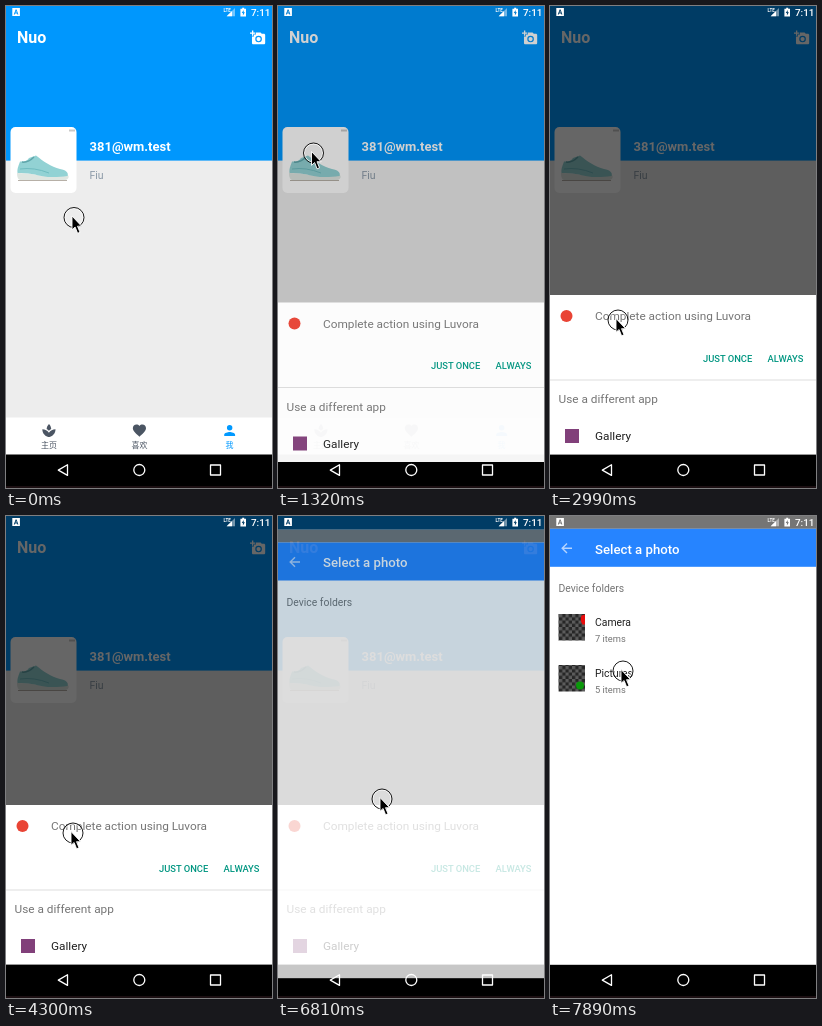
These frames come from a looping animation (266x482 px, 8 s). An HTML page:

```html
<!DOCTYPE html>
<html lang="en">
<head>
<meta charset="utf-8">
<title>Choose a picture</title>
<style>
  html, body { margin: 0; width: 100%; height: 100%; overflow: hidden; background: #000; }
  svg { display: block; width: 100vw; height: 100vh; }
  text { font-family: Roboto, "Noto Sans CJK SC", "Noto Sans CJK", sans-serif; }
  .body { font-size: 11.82px; fill: #757575; }
  .dark { fill: #212121; }
  .action { font-size: 9.38px; font-weight: 500; fill: #009681; }
  .tab { font-size: 8px; text-anchor: middle; fill: #4b5563; }
  .small { font-size: 10.4px; }
  .count { font-size: 9.3px; fill: #757575; }
</style>
</head>
<body>
<svg viewBox="0 0 266 482" preserveAspectRatio="none">
  <defs>
    <pattern id="checker" width="6.5" height="6.5" patternUnits="userSpaceOnUse" x="9" y="98">
      <rect width="6.5" height="6.5" fill="#262626"/>
      <path d="M0 0h3.25v6.5h3.25v-3.25H0z" fill="#5c5c5c"/>
    </pattern>
  </defs>

  <g id="profile">
    <rect width="266" height="449" fill="#ededed"/>
    <rect width="266" height="154.600" fill="#0097fd"/>
    <text x="11" y="37" font-size="16" font-weight="700" fill="#fff">Nuo</text>
    <path transform="translate(244 23.800) scale(.66)" fill="#fff" fill-rule="evenodd" d="M3 4V1h2v3h3v2H5v3H3V6H0V4zM6 10V7h3V4h7l1.830 2H21c1.100 0 2 .9 2 2v12c0 1.100-.9 2-2 2H5c-1.100 0-2-.9-2-2V10zM13 19a5 5 0 1 0 0-10 5 5 0 0 0 0 10zM13 17.200a3.200 3.200 0 1 1 0-6.400 3.200 3.200 0 0 1 0 6.400z"/>
    <rect x="4.500" y="121" width="66" height="66" rx="5" fill="#fff"/>
    <rect x="63" y="123.500" width="6" height="2" fill="#c9c9c9"/>
    <path d="M11 167Q25 167 36 170L62 169q2 3-2 5H14q-3-1-3-7z" fill="#dfe6e1"/>
    <path d="M11.500 167C11 162 13 159 14 155.500C18 156 21 155 23 152L30 149.500C37 155 45 161 54 163C60 164 63 167 61.500 170C48 172 36 171 29 168.500Q21 166.500 11.500 167z" fill="#92d2d4"/>
    <path d="M16 156Q22 157 28 151" fill="none" stroke="#5fa5aa" stroke-width="1.500"/>
    <path d="M14 163Q28 161 43 167" fill="none" stroke="#6fbcc0"/>
    <path d="M12 174.500h49" stroke="#988f82" stroke-width=".7"/>
    <text x="83.500" y="145" font-size="13" font-weight="700" fill="#fff">381@wm.test</text>
    <text x="83.500" y="173" font-size="10.500" fill="#8c9aa8">Fiu</text>

    <rect y="411.500" width="266" height="37.500" fill="#fff"/>
    <g fill="#4b5563">
      <path transform="translate(35 416.600) scale(.66)" d="M15.490 9.630C15.310 6.840 14.180 4.120 12.060 2 9.920 4.140 8.740 6.860 8.510 9.630 9.790 10.310 10.970 11.190 12 12.260 13.030 11.200 14.210 10.320 15.490 9.630zM12 15.450C9.850 12.170 6.180 10 2 10 2 15.320 5.360 19.820 10.030 21.490Q12 22.200 13.970 21.490C18.640 19.820 22 15.320 22 10 17.820 10 14.150 12.170 12 15.450z"/>
      <path transform="translate(125.500 416.600) scale(.66)" d="M12 21.350l-1.450-1.320C5.400 15.360 2 12.280 2 8.500 2 5.420 4.420 3 7.500 3c1.740 0 3.410.810 4.500 2.090C13.090 3.810 14.760 3 16.500 3 19.580 3 22 5.420 22 8.500c0 3.780-3.400 6.860-8.550 11.540z"/>
      <path transform="translate(215.500 416.400) scale(.68)" fill="#0099ff" d="M12 12a4 4 0 1 0 0-8 4 4 0 0 0 0 8zm0 2c-2.670 0-8 1.340-8 4v2h16v-2c0-2.660-5.330-4-8-4z"/>
    </g>
    <text class="tab" x="43" y="442">主页</text>
    <text class="tab" x="133.500" y="442">喜欢</text>
    <text class="tab" x="223.500" y="442" style="fill:#0099ff">我</text>
  </g>

  <rect id="dim" width="266" height="449"/>

  <rect y="448.500" width="266" height="33.500"/>
  <rect y="480" width="266" height="2" fill="#1c1013"/>
  <g fill="none" stroke="#fff" stroke-width="1.300" stroke-linejoin="round">
    <path d="M61.500 458.800v10.600l-9.200-5.300z"/>
    <circle cx="133.300" cy="464" r="5.500"/>
    <rect x="204.500" y="459" width="10" height="10"/>
  </g>

  <g id="sheet">
    <rect y="289" width="266" height="159.500" fill="#fff"/>
    <circle cx="16.500" cy="310" r="6" fill="#e94435"/>
    <text class="body" x="45" y="314">Complete action using Luvora</text>
    <rect id="press" x="148" y="340" width="59" height="24" rx="1" fill="#e2e2e2"/>
    <text class="action" x="153" y="355.800">JUST ONCE</text>
    <text class="action" x="217.500" y="355.800">ALWAYS</text>
    <rect y="373.500" width="266" height="1" fill="#dedede"/>
    <text class="body" x="8.500" y="397">Use a different app</text>
    <rect x="15" y="423" width="14" height="14" fill="#81407a"/>
    <text class="body dark" x="45" y="434">Gallery</text>
  </g>

  <g id="picker">
    <rect width="266" height="448.500" fill="#fff"/>
    <rect width="266" height="12.800" fill="#757575"/>
    <rect y="12.800" width="266" height="38" fill="#2684ff"/>
    <path d="M22 32.300H12.500M17 27.500l-4.800 4.800 4.800 4.800" fill="none" stroke="#b5d4ff" stroke-width="1.400"/>
    <text x="45" y="37.500" font-size="13.200" font-weight="500" fill="#fff">Select a photo</text>
    <text class="small" x="8.500" y="76" fill="#757575">Device folders</text>
    <g id="folders">
      <rect x="8.500" y="98" width="26.500" height="26.500" fill="url(#checker)"/>
      <path d="M35 98.500v10h-2.500q-3-4-1-9z" fill="#e80c0c"/>
      <text class="small dark" x="45" y="109.500">Camera</text>
      <text class="count" x="45" y="125.500">7 items</text>
      <rect x="8.500" y="149" width="26.500" height="26.500" fill="url(#checker)"/>
      <circle cx="30" cy="169.500" r="4" fill="#0a980a"/>
      <text class="small dark" x="45" y="160.500">Pictures</text>
      <text class="count" x="45" y="176.500">5 items</text>
    </g>
  </g>

  <g fill="#fff">
    <path fill-rule="evenodd" d="M6.300 2h7.600v8H6.300zM9.600 3.500L7.800 8.600h1l.4-1.200h1.800l.4 1.200h1L10.600 3.500zM10.100 4.700l.6 1.900H9.500z"/>
    <text x="217.500" y="5.500" font-size="4.500" font-weight="700">LTE</text>
    <path d="M229 2v8.300h-8.300z" opacity=".45"/>
    <path d="M226 5v5.300h-5.300z"/>
    <path fill-rule="evenodd" d="M236.200 1.800h2v1h1.800v7.700h-5.600V2.800h1.800zM237.700 4l-2 3h1.200v2.400l2-3.200h-1.200z"/>
    <text x="245" y="10" font-size="9.900" font-weight="500">7:11</text>
  </g>

  <g id="cursor">
    <circle r="9.100" fill="none" stroke="#fff" stroke-opacity=".85"/>
    <circle r="10" fill="none" stroke="#000" stroke-width=".9"/>
    <path d="M-2-1.500V12.300L1.100 9.500 3.600 15.800 6 14.800 3.500 8.700H7.600z" stroke="#fff" stroke-width=".9"/>
  </g>
</svg>
<script>
const LOOP = 8000;
const START = { x: 68, y: 211.5 };

// [first step, last step, step count, bend x, bend y, end x, end y]
const MOVES = [
  [120, 480, 4, 50, 180, 35.5, 147],
  [1910, 2030, 2, 88, 214, 146, 284.5],
  [2270, 2750, 5, 100, 434, 68, 312],
  [2990, 2990, 1, 68, 313, 68, 314],
  [3230, 3580, 4, 70, 350, 67, 319],
  [4300, 4420, 2, 69.5, 318.5, 62, 312],
  [5020, 5260, 3, 120, 330, 183, 355],
  [6570, 6810, 3, 140, 318, 104, 283],
  [6930, 7290, 4, 125, 315, 160, 348],
  [7410, 7890, 5, 115, 240, 73, 155]
];

const $ = id => document.getElementById(id);
const [dim, sheet, press, picker, folders, cursor] =
  ["dim", "sheet", "press", "picker", "folders", "cursor"].map($);
const show = (el, on) => el.setAttribute("display", on ? "inline" : "none");
const place = (el, x, y) => el.setAttribute("transform", `translate(${x} ${y})`);
const fade = (el, value) => el.setAttribute("opacity", value);
const smooth = u => u * u * (3 - 2 * u);
const bend = (a, b, c, u) => (1 - u) ** 2 * a + 2 * u * (1 - u) * b + u * u * c;
const stepsSince = (t, start) => Math.floor((t - start) / 120);

function pointer(t) {
  let { x, y } = START;
  for (const [first, last, count, bx, by, ex, ey] of MOVES) {
    if (t < first) break;
    const gap = count > 1 ? (last - first) / (count - 1) : 1;
    const step = Math.min(count, Math.floor((t - first) / gap + 1e-6) + 1);
    const u = smooth(step / count);
    x = bend(x, bx, ex, u);
    y = bend(y, by, ey, u);
  }
  return [x, y];
}

function draw(t) {
  const opened = stepsSince(t, 1320);
  show(dim, opened >= 0);
  show(sheet, opened >= 0);
  if (opened >= 0) {
    fade(dim, Math.min(0.6, 0.185 + 0.24 * opened));
    fade(sheet, opened ? 1 : 0.96);
    place(sheet, 0, opened < 2 ? 7.5 * 0.25 ** opened : 0);
  }
  show(press, t >= 5980 && t < 6690);

  const entered = stepsSince(t, 6810);
  show(picker, entered >= 0);
  if (entered >= 0) {
    fade(picker, entered ? 1 : 0.78);
    place(picker, 0, entered < 3 ? 13.7 * 0.25 ** entered : 0);
    show(folders, entered >= 2);
  }
  place(cursor, ...pointer(t));
}

function tick() {
  draw(performance.now() % LOOP);
  requestAnimationFrame(tick);
}
tick();
</script>
</body>
</html>
```
